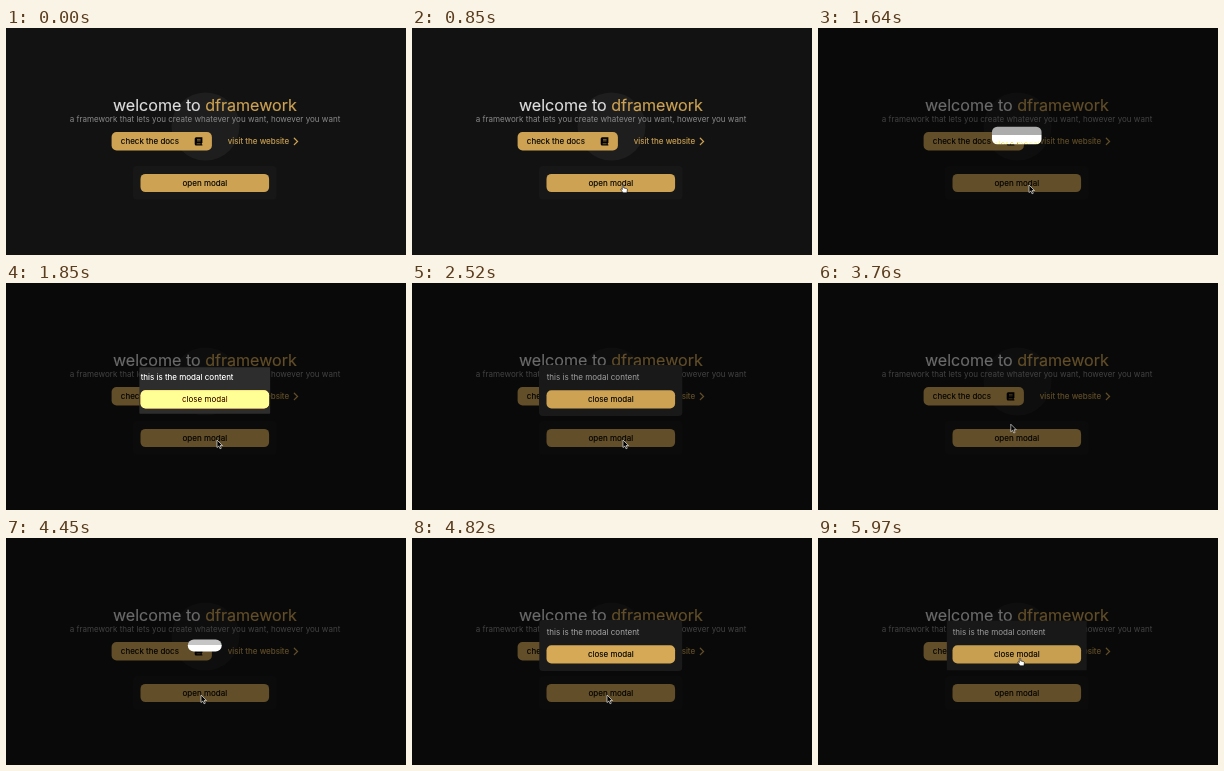
Write an HTML page that moves like this. It is 400 by 227 pixels and loops after 6 s.

```html
<!DOCTYPE html>
<html lang="en">
<head>
<meta charset="utf-8">
<style>
  html, body { margin: 0; width: 100%; height: 100%; overflow: hidden; background: #121212; }
  svg { display: block; width: 400px; height: 227px; cursor: default; }
  text { font: 8.04px Inter, sans-serif; fill: #000; stroke: #000; stroke-width: .12; }
  .mid { text-anchor: middle; }
  .title { font-size: 16.08px; fill: #dededf; stroke: #dededf; stroke-width: .15; }
  .muted { fill: #8a8a8a; stroke: none; }
  .gold { fill: #cda353; }
  text.gold, tspan.gold { stroke: #cda353; }
  .card { fill: #171717; }
</style>
</head>
<body>
<svg viewBox="0 0 400 227">
  <defs>
    <clipPath id="clip"><rect id="hole"/></clipPath>
  </defs>

  <rect width="400" height="227" fill="#121212"/>
  <circle cx="199.5" cy="98.5" r="34" fill="#1e1e1e"/>
  <text class="title mid" x="198.9" y="82.5">welcome to <tspan class="gold">dframework</tspan></text>
  <text class="muted mid" x="199" y="94.2">a framework that lets you create whatever you want, however you want</text>

  <rect class="gold" x="105.6" y="104.1" width="100.3" height="18.3" rx="5"/>
  <text x="114.8" y="116.1">check the docs</text>
  <path d="M190.2 109.3h6.2v5.8h-.6v1.4h.6v1h-6.2a1.5 1.5 0 0 1-1.5-1.5v-5.2a1.5 1.5 0 0 1 1.5-1.5z"/>
  <path d="M191 111.4h3.6M191 112.9h3.6M190.6 115.8h4" stroke="#cda353" stroke-width=".6"/>
  <text class="gold" x="221.8" y="116.1">visit the website</text>
  <path d="M288.3 110.2l3.2 3.2-3.2 3.2" fill="none" stroke="#cda353" stroke-width="1.3" stroke-linecap="round"/>

  <rect class="card" x="127" y="138" width="143.5" height="33.5" rx="4"/>
  <rect class="gold" x="134.5" y="145.9" width="128.6" height="18.2" rx="5"/>
  <text class="mid" x="198.8" y="158">open modal</text>

  <g id="dialog">
    <rect width="400" height="227" opacity=".52"/>
    <g clip-path="url(#clip)">
      <g id="modal">
        <rect x="127" y="82" width="143.5" height="51" rx="4" fill="#191919"/>
        <text class="muted" x="134.7" y="97.4" style="fill:#a0a0a0">this is the modal content</text>
        <rect class="gold" x="134.5" y="107.3" width="128.6" height="18.2" rx="5"/>
        <text class="mid" x="198.8" y="119.3">close modal</text>
      </g>
    </g>
  </g>

  <g id="cursor" stroke-width=".6" stroke-linejoin="round">
    <path id="arrow" stroke="#fff" d="M0 0v7.6l1.8-1.6 1.2 2.8 1.3-.6-1.2-2.7h2.4z"/>
    <path id="hand" fill="#fff" stroke="#000" d="M-.7.5q.7-1 1.4 0v2.4l2.9.7q.9.3.8 1.3l-.5 2.9h-3.8l-2.3-3q-.2-1.1.8-.8l.7.6z"/>
  </g>
</svg>
<script>
const LOOP = 6000, FADE = 500;
const openings = [[1530, 3270], [4364, 5950]];   // click to open, click to close
// time, x, y
const route = [
  [60, 222, 232], [800, 211, 157], [2550, 211, 157], [3120, 190, 121],
  [3420, 190, 121], [4050, 195, 157], [5100, 195, 157], [5750, 202, 120], [LOOP, 202, 120]
];
const box = { x: 127, y: 82, w: 143.5, h: 51 };
const $ = id => document.getElementById(id);
const clamp = v => Math.min(1, Math.max(0, v));
const show = (id, on) => $(id).setAttribute('visibility', on ? 'visible' : 'hidden');

// CSS "ease": cubic-bezier(.25, .1, .25, 1)
function ease(x) {
  const curve = (u, a, b) => 3 * u * (1 - u) ** 2 * a + 3 * u * u * (1 - u) * b + u ** 3;
  let lo = 0, hi = 1;
  for (let i = 0; i < 20; i++) {
    const mid = (lo + hi) / 2;
    if (curve(mid, .25, .25) < x) lo = mid; else hi = mid;
  }
  return curve(lo, .1, 1);
}

function pointer(t) {
  const i = route.findIndex(p => p[0] > t);
  if (i < 1) return route[0].slice(1);
  const [t0, x0, y0] = route[i - 1], [t1, x1, y1] = route[i];
  const u = (t - t0) / (t1 - t0), k = u * u * (3 - 2 * u);
  return [x0 + (x1 - x0) * k, y0 + (y1 - y0) * k];
}

function draw(t) {
  const span = openings.find(([a, b]) => t >= a && t < b + FADE);
  show('dialog', span);
  if (span) {
    const [start, end] = span;
    const closing = t >= end;
    const p = ease(clamp((t - (closing ? end : start)) / FADE));
    const inset = (closing ? p : 1 - p) / 2;
    const size = 1 - 2 * inset;
    const rect = {
      x: box.x + box.w * inset, y: box.y + box.h * inset,
      width: box.w * size, height: box.h * size, rx: 16 * inset
    };
    for (const k in rect) $('hole').setAttribute(k, rect[k]);
    $('modal').style.filter = `brightness(${closing ? 1 - p : 10 - 9 * p})`;
  }

  const [x, y] = pointer(t);
  const top = span ? 107 : 146;
  const hover = x > 134 && x < 263 && y > top && y < top + 18;
  $('cursor').setAttribute('transform', `translate(${x} ${y})`);
  show('arrow', !hover);
  show('hand', hover);
}

const begin = performance.now();
function tick() {
  draw((performance.now() - begin) % LOOP);
  requestAnimationFrame(tick);
}
tick();
</script>
</body>
</html>
```
